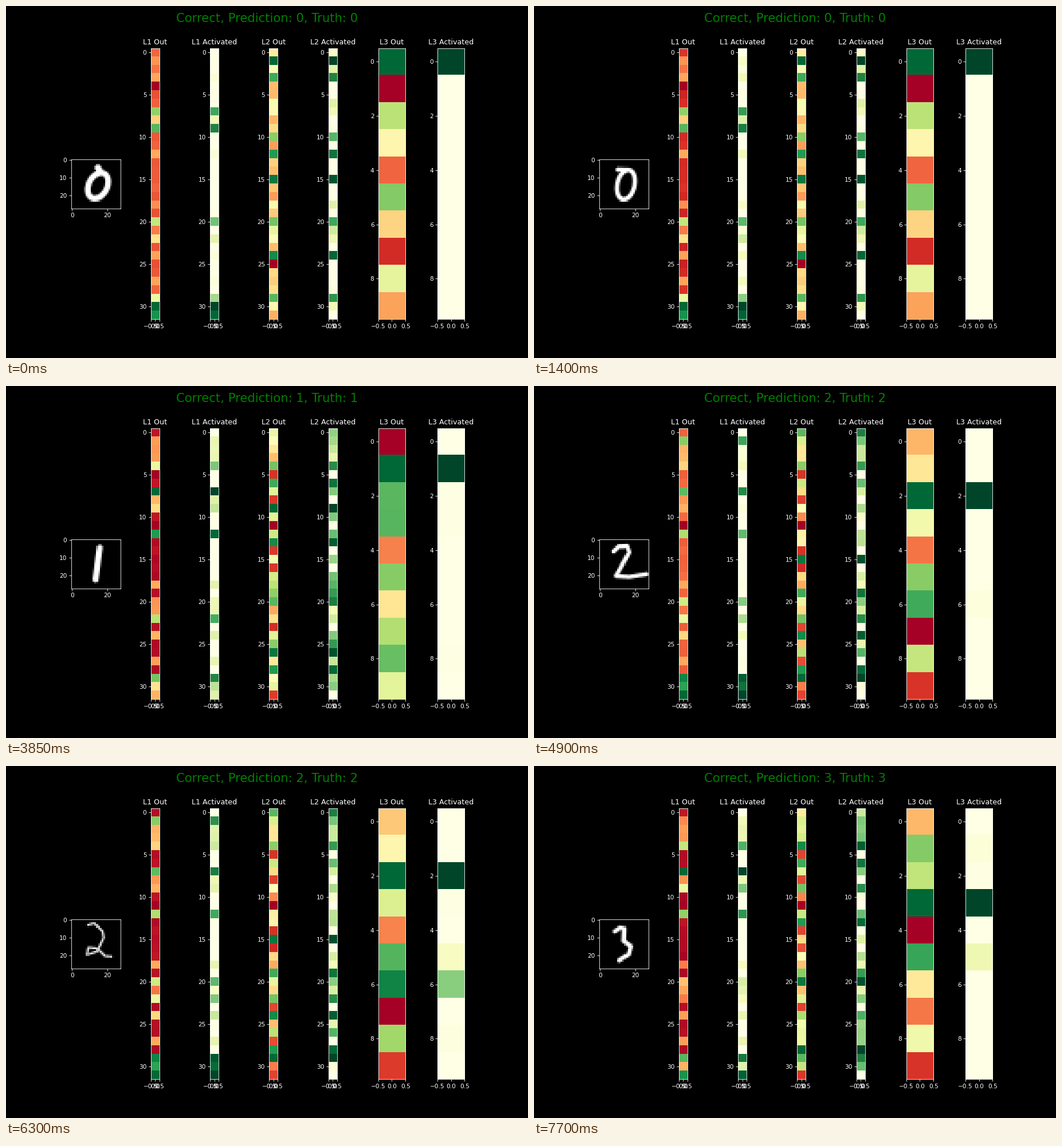
Recreate the animation shown at these times as a matplotlib script. Size 911 by 615 pixels, loop 8000 ms.

```python
import matplotlib.pyplot as plt
import numpy as np
from matplotlib.animation import FuncAnimation
from matplotlib.lines import TICKDOWN, TICKLEFT

W, H, DPI = 911, 615, 911 / 12
LOOP, TICK, HOLD = 8000, 50, 350
PT = DPI / 72
LEFT, RIGHT = 0.125 * W, 0.8999 * W
TOP, BOTTOM = 0.12 * H, 0.89 * H
CELL = (RIGHT - LEFT) / 8.2         # seven columns, gaps of a fifth
PITCH = 1.2 * CELL

RESPONSIVE = [1, 2, 3, 4, 7, 8, 9, 12, 18, 20, 21, 22, 24, 27, 29, 30, 31]
INHIBITED = [5, 8, 11, 14, 16, 23, 31]


def resample(points, n=70):
    p = np.array(points, float)
    s = np.r_[0, np.cumsum(np.hypot(*np.diff(p, axis=0).T))]
    t = np.linspace(0, s[-1], n)
    return np.column_stack([np.interp(t, s, p[:, 0]), np.interp(t, s, p[:, 1])])


def ring(tip, cx, cy, rx, ry, lean):
    a = np.linspace(0, 2 * np.pi, 40)
    x, y = -rx * np.sin(a), -ry * np.cos(a)
    return resample([tip, *zip(cx + x - lean * y, cy + y)])


def bar(x, lean):
    return resample([(x + lean * 9, 4.5), (x - lean * 9, 22.3)])


two = resample([(7.5, 6.5), (10.5, 3.8), (15, 3.6), (16.3, 7), (10.3, 18),
                (8.8, 20.5), (16.3, 21), (26, 19.4)])
looped_two = resample([(9, 3), (12.5, 2), (17, 6.5), (17.7, 10), (13.8, 18),
                       (8.3, 19.7), (9, 15.5), (13.8, 16), (18.5, 20.5), (22, 20.8)])
three = resample([(8.2, 6.5), (11.2, 4.5), (13.5, 5), (13.2, 12), (17.2, 15),
                  (16, 19.5), (10.8, 22.8)])

# Per digit: strongest units of both hidden layers and the runner-up digits, in
# falling order; pairs go from the first to the last sample of the digit.
DIGITS = [
    dict(start=0, first=0, rest=(17, 9), hush=31, dead=(4, 25),
         top1=[30, 31, 9, 7, 20, 29], top2=[1, 15, 24, 12, 3, 29, 20, 10],
         rivals=[5, 2, 8, 3, 6, 9, 4, 7, 1], near=(75, 75), bend=1, pen=(1.7, 1.3),
         strokes=(ring((14.5, 4.5), 14.5, 14.6, 5.5, 7.2, 0.25),
                  ring((10, 5.5), 14.5, 14, 4.9, 8.3, 0.15))),
    dict(start=5, first=7, rest=(3, 3), hush=11, dead=(11, 11),
         top1=[7, 12, 29, 22, 4], top2=[9, 26, 13, 28, 6, 20, 4, 25],
         rivals=[3, 2, 8, 5, 7, 9, 6, 4, 0], near=(82, 82), bend=2.5, pen=(1.2, 1.6),
         strokes=(bar(14, 0.03), bar(14.3, 0.13))),
    dict(start=14, first=14, rest=(19, 4), hush=11, dead=(11, 11),
         top1=[31, 29, 30, 7, 1, 12, 20, 22], top2=[29, 15, 24, 28, 19, 0, 22, 4],
         rivals=[6, 5, 8, 3, 1, 0, 4, 9, 7], near=(85, 94), bend=1, pen=(1.2, 0.6),
         strokes=(two, looped_two)),
    dict(start=19, first=18, rest=(3, 3), hush=13, dead=(11, 11),
         top1=[7, 31, 29, 12, 4, 9], top2=[28, 20, 4, 13, 6, 29, 9, 19],
         rivals=[5, 1, 2, 8, 6, 0, 7, 9, 4], near=(86, 86), bend=1, pen=(1.2, 1.2),
         strokes=(three, three)),
]


def digit_at(step):
    return max(d for d, p in enumerate(DIGITS) if step >= p["start"])


def ranked(rows, high, low):
    return rows, np.linspace(high, low, len(rows))


def ink(stroke, pen):
    y, x = np.mgrid[:28, :28]
    d = np.hypot(x[..., None] - stroke[:, 0], y[..., None] - stroke[:, 1]).min(-1)
    return np.clip(pen + 0.5 - d, 0, 1)


def relu(v, zero):
    return np.maximum(v - zero, 0) / (100 - zero)


def panels_at(step):
    digit = digit_at(step)
    p = DIGITS[digit]
    phase = (step - p["first"]) / 4
    u = np.clip(phase, 0, 1)
    sway = abs(np.sin(np.pi * phase))
    base, vary = np.random.RandomState(digit), np.random.RandomState(100 + step)

    def mix(pair):
        return (1 - u) * pair[0] + u * pair[1]

    def settle(out):
        return np.clip(out * (1 + 0.06 * sway * vary.normal(size=out.size)), 0, 100)

    rest = mix(p["rest"])
    out1 = rest + base.normal(0, 1.2, 32)
    out1[RESPONSIVE] = base.normal(31, 5, len(RESPONSIVE))
    rows, levels = ranked(p["top1"], 100, 55)
    out1[rows] = levels
    out1[p["dead"][0]] = 0

    out2 = base.normal(47, 12, 32)
    out2[INHIBITED] = p["hush"] + base.normal(0, 2, len(INHIBITED))
    rows, levels = ranked(p["top2"], 100, 74)
    out2[rows] = levels
    out2[p["dead"][1]] = 0

    out3 = np.full(10, 100.0)
    rows, t = ranked(p["rivals"], 0, 1)
    out3[rows] = mix(p["near"]) * (1 - t ** p["bend"])

    out1, out2, out3 = settle(out1), settle(out2), settle(out3)
    out3[digit] = 100
    gain = np.interp(step, [14, 18], [25, 13])
    columns = [out1, relu(out1, rest + 9), out2, relu(out2, p["hush"] + 8),
               out3, np.exp(gain * (out3 / 100 - 1))]

    x, y = mix(p["strokes"]).T
    x = x + sway * (0.1 * vary.normal() * (13 - y) + 0.08 * vary.normal() * (x - 14))
    return [ink(np.column_stack([x, y]), mix(p["pen"]))] + [c[:, None] for c in columns]


scenes = [panels_at(s) for s in range(-(-LOOP // HOLD))]

fig = plt.figure(figsize=((W + 1e-6) / DPI, (H + 1e-6) / DPI), dpi=DPI, facecolor="black")
page = fig.add_axes([0, 0, 1, 1], xlim=(0, W), ylim=(H, 0), zorder=2)
page.axis("off")


def label(x, y, s, size=10, color="white", **align):
    return page.text(x, y, s, fontsize=size, color=color,
                     fontfamily="DejaVu Sans", **align)


def ticks(xs, ys, marker):
    page.plot(xs, ys, ls="none", marker=marker, ms=3.5, mew=0.8, color="white")


def panel(col, rows, cols, cmap, vmax, xticks, yticks, title=""):
    unit = min(CELL / cols, (BOTTOM - TOP) / rows)
    cx, cy = LEFT + col * PITCH + CELL / 2, (TOP + BOTTOM) / 2
    w, h = unit * cols, unit * rows
    x0, y0 = cx - w / 2, cy - h / 2
    ax = fig.add_axes([x0 / W, 1 - (y0 + h) / H, w / W, h / H])
    im = ax.imshow(np.zeros((rows, cols)), cmap=cmap, vmin=0, vmax=vmax, aspect="auto")
    ax.set(xticks=[], yticks=[])
    ax.spines[:].set(color="white", linewidth=0.8)
    tx = [x0 + (t + 0.5) * unit for t in xticks]
    ty = [y0 + (t + 0.5) * unit for t in yticks]
    ticks(tx, [y0 + h] * len(tx), TICKDOWN)
    ticks([x0] * len(ty), ty, TICKLEFT)
    for x, t in zip(tx, xticks):
        label(x, y0 + h + 7 * PT, str(t).replace("-", "\u2212"), ha="center", va="top")
    for y, t in zip(ty, yticks):
        label(x0 - 7 * PT, y, str(t), ha="right", va="center_baseline")
    label(cx, y0 - 6 * PT, title, size=12, ha="center", va="baseline")
    return im


images = [panel(0, 28, 28, "gray", 1, [0, 20], [0, 10, 20])]
for i in range(6):
    layer, activated = i // 2 + 1, i % 2
    rows, gap = (10, 2) if layer == 3 else (32, 5)
    images.append(panel(i + 1, rows, 1, "YlGn" if activated else "RdYlGn",
                        1 if activated else 100, [-0.5, 0.0, 0.5],
                        range(0, rows, gap),
                        f"L{layer} {'Activated' if activated else 'Out'}"))
headline = label(W / 2, 0.02 * H, "", size=20, color="green", ha="center", va="top")


def update(i):
    step = i * TICK // HOLD
    d = digit_at(step)
    headline.set_text(f"Correct, Prediction: {d}, Truth: {d}")
    for im, data in zip(images, scenes[step]):
        im.set_data(data)
    return [headline, *images]


anim = FuncAnimation(fig, update, frames=LOOP // TICK, interval=TICK,
                     repeat=True, repeat_delay=0, blit=False)
plt.show()
```
